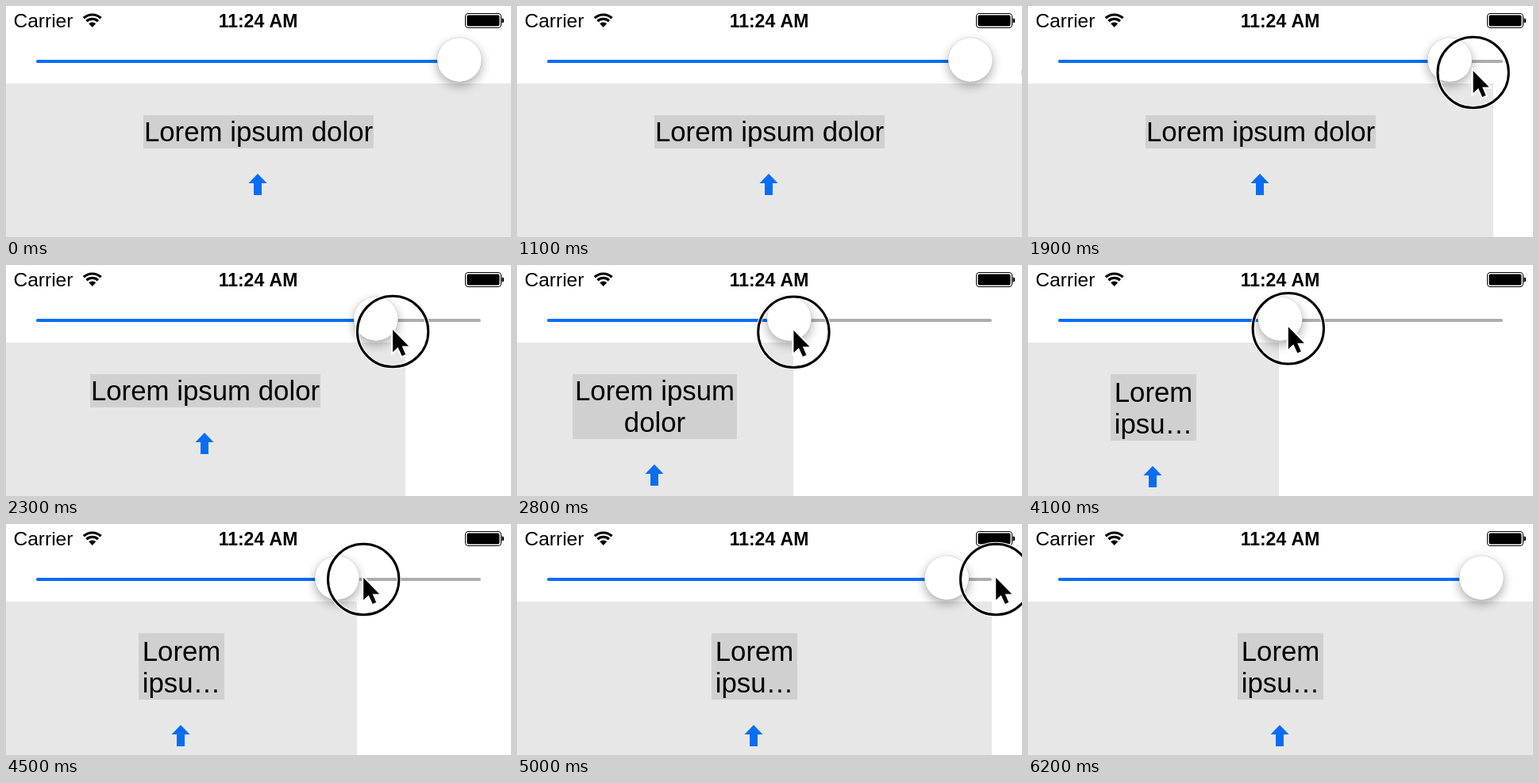
Write an HTML page with a canvas that moves like this. It is 636 by 292 pixels and loops after 6500 ms.

```html
<!DOCTYPE html>
<html lang="en">
<head>
<meta charset="utf-8">
<title>Label resizing with a slider</title>
<style>
  html, body { margin: 0; width: 100%; height: 100%; overflow: hidden; background: #fff; }
  canvas { display: block; }
</style>
</head>
<body>
<canvas id="stage" width="636" height="292"></canvas>
<script>
const ctx = document.getElementById('stage').getContext('2d');
const LOOP = 6500, STEP = 100;
const WIDTH = 636, THUMB_MAX = 571;
const FULL = 290, NARROW = 108, SHRUNK_AT = 3400;
const BLUE = '#076df5', SANS = '"Liberation Sans", Arial, sans-serif';
const LABEL_FONT = '34.8px ' + SANS;

const ramp = (t, from, to) => Math.min(1, Math.max(0, (t - from) / (to - from)));
const ease = f => f - 0.06 * Math.sin(2 * Math.PI * f);

// The pointer enters, grabs the thumb, drags it left, rests, drags it back and leaves.
function pose(t) {
  const left = ease(ramp(t, 1800, SHRUNK_AT));
  const thumb = THUMB_MAX - 28 * ramp(t, 1500, 1700) - 300 * left + 328 * ramp(t, 3800, 5120);
  return {
    thumb,
    width: WIDTH - 1.262 * (THUMB_MAX - thumb),
    x: 700 - 126 * ramp(t, 1000, 1700) - 338 * left + 0.306 * Math.max(0, t - 3800),
    y: 84 + 4 * left ** 4 - 18 * ramp(t, 3800, 4500)
  };
}

function rect(x, y, w, h, color) {
  ctx.fillStyle = color;
  ctx.fillRect(x, y, w, h);
}

function pill(x, y, w, h, r, color) {
  ctx.beginPath();
  ctx.roundRect(x, y, w, h, r);
  ctx.fillStyle = color;
  ctx.fill();
}

function circle(x, y, r) {
  ctx.beginPath();
  ctx.arc(x, y, r, 0, Math.PI * 2);
}

function stroke(color, width) {
  ctx.strokeStyle = color;
  ctx.lineWidth = width;
  ctx.stroke();
}

function text(str, x, y, font, align) {
  ctx.font = font;
  ctx.textAlign = align;
  ctx.fillStyle = '#000';
  ctx.fillText(str, x, y);
}

function statusBar() {
  text('Carrier', 9.5, 27, '24.5px ' + SANS, 'left');
  text('11:24 AM', 317.5, 27, 'bold 23px ' + SANS, 'center');

  const up = -Math.PI / 2, spread = 0.75;
  for (const r of [16, 10.6]) {
    ctx.beginPath();
    ctx.arc(108.7, 27, r, up - spread, up + spread);
    stroke('#000', 3.2);
  }
  ctx.beginPath();
  ctx.moveTo(108.7, 27);
  ctx.arc(108.7, 27, 6.6, up - spread, up + spread);
  ctx.fill();

  ctx.beginPath();
  ctx.roundRect(578.5, 9.5, 45, 18, 3.5);
  stroke('#000', 1);
  pill(580.5, 11.5, 41, 14, 2, '#000');
  pill(624.5, 15.5, 2.5, 6, [0, 2, 2, 0], '#000');
}

// Breaks the text over at most two lines and cuts the tail that does not fit.
function wrap(width) {
  if (width >= FULL) return ['Lorem ipsum dolor'];
  ctx.font = LABEL_FONT;
  const fits = s => ctx.measureText(s).width <= width;
  if (fits('Lorem ipsum')) return ['Lorem ipsum', 'dolor'];
  let tail = 'ipsum dolor';
  while (!fits(tail + '…')) tail = tail.slice(0, -1).trim();
  return ['Lorem', tail + '…'];
}

function upArrow(x, y) {
  ctx.beginPath();
  ctx.moveTo(x, y);
  ctx.lineTo(x + 11.5, y + 12);
  ctx.lineTo(x - 11.5, y + 12);
  ctx.fillStyle = BLUE;
  ctx.fill();
  ctx.fillRect(x - 5, y + 11, 10, 16);
}

function panel(t, w) {
  rect(0, 98, w, 194, '#e7e7e7');
  // Once squeezed, the label keeps its narrow width.
  const width = t < SHRUNK_AT ? Math.max(NARROW, Math.min(FULL, w - 141)) : NARROW;
  const mid = (w - 1) / 2;
  const left = Math.round(mid - width / 2);
  const lines = wrap(width);
  const pad = lines[0] === 'Lorem' ? 2 : 0;
  const height = lines.length * 40 + 2 + pad;
  rect(left, 138, width, height, '#d0d0d0');
  lines.forEach((s, i) => text(s, left + width / 2, 171 + pad + i * 40, LABEL_FONT, 'center'));
  upArrow(Math.round(mid - 1), 170 + height);
}

function slider(x) {
  pill(38, 68, 560, 4, 2, '#adadad');
  pill(38, 68, x - 38, 4, 2, BLUE);
  ctx.save();
  ctx.shadowColor = 'rgba(0,0,0,.33)';
  ctx.shadowBlur = 13;
  ctx.shadowOffsetY = 5;
  circle(x, 68, 28);
  ctx.fillStyle = '#fff';
  ctx.fill();
  ctx.restore();
  stroke('rgba(0,0,0,.1)', 1);
}

function pointer(x, y) {
  circle(x, y, 44.7);
  stroke('#fff', 5);
  stroke('#000', 3);

  const outline = [[0, 0], [0, 28], [6.5, 22], [11.5, 33], [16, 31], [11.5, 20.5], [20, 20.5]];
  ctx.beginPath();
  outline.forEach(([dx, dy]) => ctx.lineTo(x + dx, y - 2 + dy));
  ctx.closePath();
  stroke('#fff', 4);
  ctx.fillStyle = '#000';
  ctx.fill();
}

const start = performance.now();

function draw() {
  const t = Math.floor((performance.now() - start) % LOOP / STEP) * STEP;
  const { thumb, width, x, y } = pose(t);
  rect(0, 0, WIDTH, 292, '#fff');
  panel(t, Math.round(width));
  statusBar();
  slider(thumb);
  pointer(x, y);
  requestAnimationFrame(draw);
}

draw();
</script>
</body>
</html>
```
